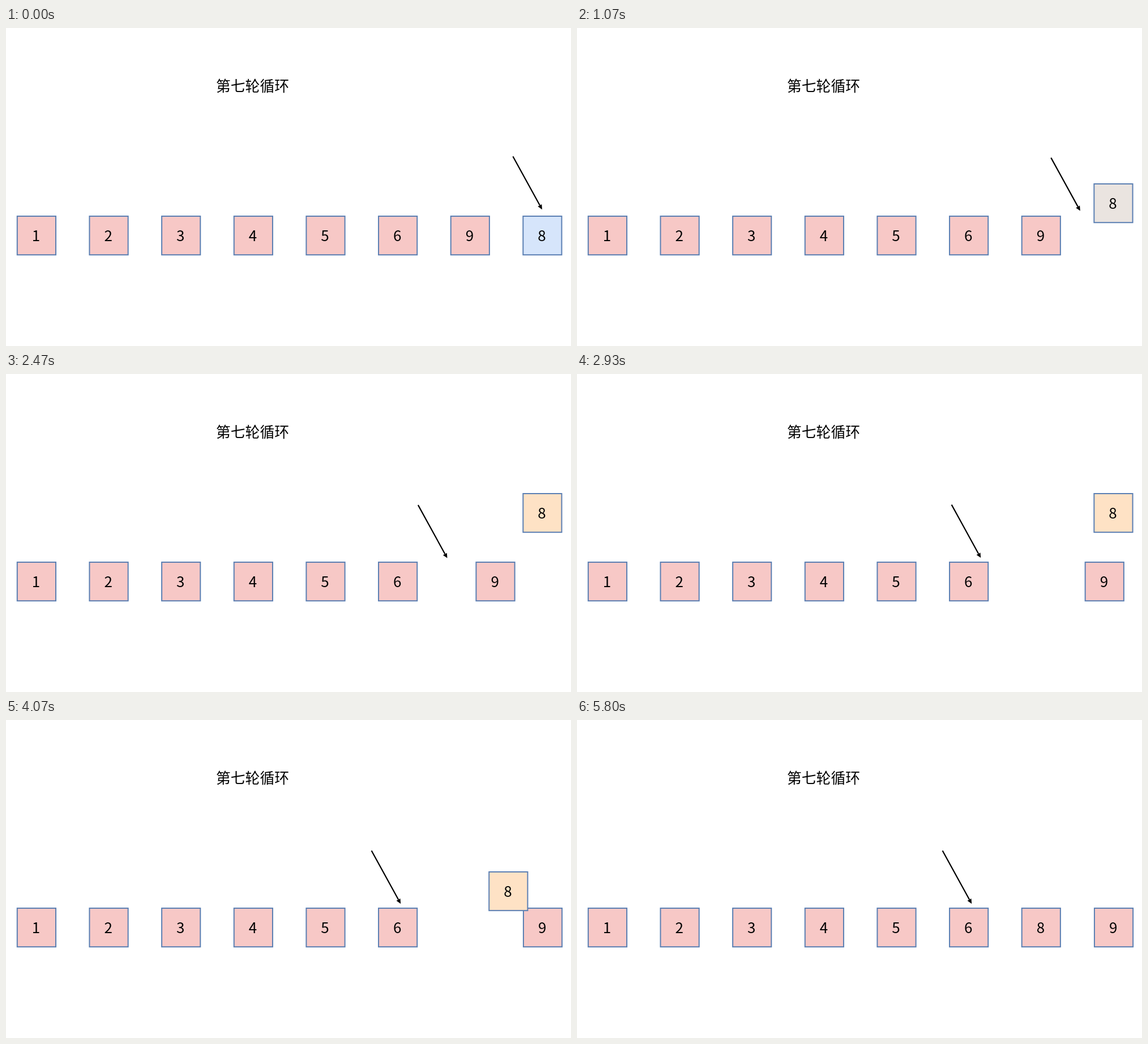
Write an HTML page that moves like this. It is 998x561 px and loops after 6.67 s.

```html
<!DOCTYPE html>
<html lang="zh-CN">
<head>
<meta charset="utf-8">
<title>插入排序</title>
<style>
  html, body { margin: 0; width: 100%; height: 100%; overflow: hidden; background: #fff; }
  svg { display: block; width: 100vw; height: 100vh; }
  text { font: 26px "Noto Sans CJK SC", "Noto Sans CJK", "Noto Sans", sans-serif; fill: #000; }
  rect { stroke: #5b7fb3; stroke-width: 2; }
</style>
</head>
<body>
<svg id="stage" viewBox="0 0 998 561">
  <text x="371" y="112" style="font-size:25.8px">第七轮循环</text>
  <g id="arrow">
    <path d="M0 0L47.5 86.3" stroke="#000" stroke-width="2.2" fill="none"/>
    <path d="M51.6 93.7L44 88.3L50.9 84.5Z"/>
  </g>
</svg>
<script>
const LOOP = 6670, STEP = 1000 / 15;
const MOVE = 1500, LIFT = 340, SHIFT = LIFT + MOVE, DROP = SHIFT + MOVE;
const ROW = 331, TOP = 210;
const PINK = [247, 200, 198], BLUE = [214, 229, 251], ORANGE = [254, 226, 197];
const stage = document.getElementById("stage");
const arrow = document.getElementById("arrow");

const slot = i => 18.8 + i * 127.65;
const mix = (a, b, p) => a + (b - a) * p;
const blend = (a, b, p) => `rgb(${a.map((v, i) => Math.round(mix(v, b[i], p)))})`;
const progress = (t, start, length) => Math.min(1, Math.max(0, (t - start) / length));
const smooth = x => x * x * x * (x * (6 * x - 15) + 10);
const place = (node, x, y) =>
  node.setAttribute("transform", `translate(${x.toFixed(2)} ${y.toFixed(2)})`);

function add(parent, tag, attrs) {
  const node = document.createElementNS("http://www.w3.org/2000/svg", tag);
  for (const key in attrs) node.setAttribute(key, attrs[key]);
  return parent.appendChild(node);
}

function addBox(digit, i) {
  const group = add(stage, "g", {});
  const rect = add(group, "rect", { x: 1, y: 1, width: 68.2, height: 68.2, fill: blend(PINK, PINK, 0) });
  add(group, "text", { x: 34.2, y: 45.3, "text-anchor": "middle" }).textContent = digit;
  place(group, slot(i), ROW);
  return { group, rect };
}

const boxes = [1, 2, 3, 4, 5, 6, 9, 8].map(addBox);
const [nine, eight] = boxes.slice(6);

function draw(time) {
  // The picture advances 15 times a second.
  const t = Math.floor((time % LOOP + 5) / STEP) * STEP;
  const lift = smooth(progress(t, LIFT, MOVE));
  const shift = smooth(progress(t, SHIFT, MOVE));
  const drop = smooth(progress(t, DROP, MOVE));

  place(arrow, 895.4 - 123.5 * lift - 126.3 * shift, 226.5 + 5 * lift - 1 * shift);
  place(nine.group, mix(slot(6), slot(7) + 0.6, shift), ROW);
  place(eight.group, mix(slot(7), slot(6), drop), mix(ROW, TOP, lift - drop));

  const landed = progress(t, DROP + MOVE, 620);
  eight.rect.setAttribute("fill", landed > 0
    ? blend(ORANGE, PINK, landed)
    : blend(BLUE, ORANGE, progress(t, LIFT - 20, MOVE)));
}

const begin = performance.now();
function tick() {
  draw(performance.now() - begin);
  requestAnimationFrame(tick);
}
tick();
</script>
</body>
</html>
```
